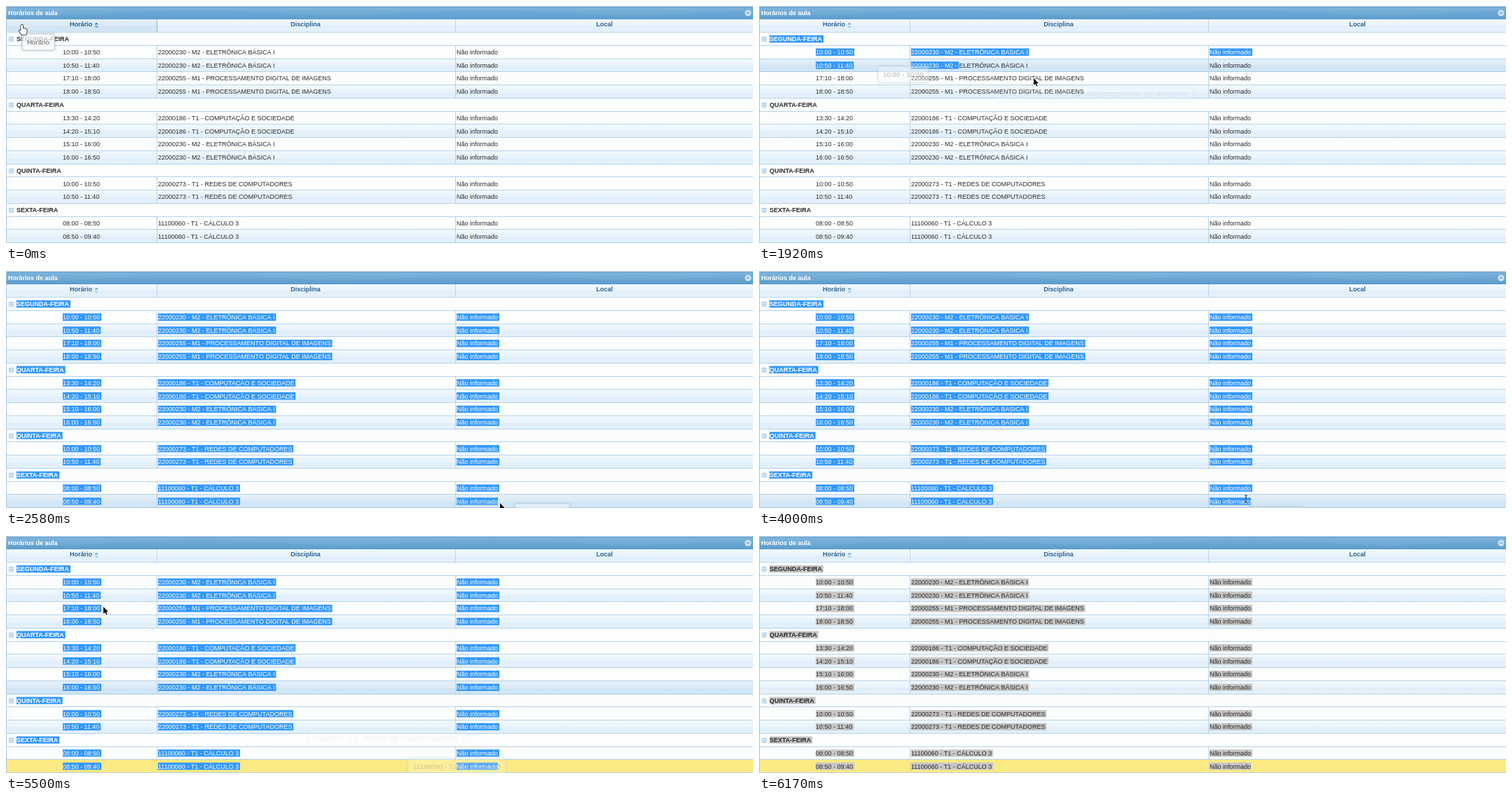
Animation of 1066 by 338 pixels, one loop 6.67 s. Source, as an HTML page with a canvas:

```html
<!DOCTYPE html>
<html lang="pt-BR">
<head>
<meta charset="utf-8">
<title>Horários de aula</title>
<style>
  html, body { margin: 0; width: 100%; height: 100%; overflow: hidden; background: #fcfdfd; }
  canvas { display: block; width: 1066px; height: 338px; }
</style>
</head>
<body>
<canvas id="stage" width="1066" height="338"></canvas>
<script>
const ctx = document.getElementById('stage').getContext('2d');
const W = 1066, H = 338, LOOP = 6670, TICK = 250 / 3;
const TOP = 38, PITCH = 18.76;
const COLUMNS = [81, 217, 643];
const FAMILY = '"Liberation Sans", Arial, sans-serif';
const REGULAR = `9px ${FAMILY}`, BOLD = `bold 9px ${FAMILY}`, TIP = `9.8px ${FAMILY}`;

const ELECTRONICS = '22000230 - M2 - ELETRÔNICA BÁSICA I';
const IMAGES = '22000255 - M1 - PROCESSAMENTO DIGITAL DE IMAGENS';
const SOCIETY = '22000186 - T1 - COMPUTAÇÃO E SOCIEDADE';
const NETWORKS = '22000273 - T1 - REDES DE COMPUTADORES';
const CALCULUS = '11100060 - T1 - CÁLCULO 3';
const NO_PLACE = 'Não informado';

const group = (day, ...lessons) => [
  { day },
  ...lessons.map(([time, course], i) => ({ cells: [time, course, NO_PLACE], even: i % 2 === 1 }))
];
const rows = [
  ...group('SEGUNDA-FEIRA', ['10:00 - 10:50', ELECTRONICS], ['10:50 - 11:40', ELECTRONICS],
    ['17:10 - 18:00', IMAGES], ['18:00 - 18:50', IMAGES]),
  ...group('QUARTA-FEIRA', ['13:30 - 14:20', SOCIETY], ['14:20 - 15:10', SOCIETY],
    ['15:10 - 16:00', ELECTRONICS], ['16:00 - 16:50', ELECTRONICS]),
  ...group('QUINTA-FEIRA', ['10:00 - 10:50', NETWORKS], ['10:50 - 11:40', NETWORKS]),
  ...group('SEXTA-FEIRA', ['08:00 - 08:50', CALCULUS], ['08:50 - 09:40', CALCULUS])
];
const LAST = rows.length - 1;

// Pointer path: tick, x, y
const path = [
  [0, 22, 27], [1, 19, 34], [3, 13, 47], [19, 13, 47], [20, 70, 55], [21, 169, 72], [22, 285, 85],
  [23, 392, 103], [24, 540, 140], [25, 659, 178], [26, 686, 196], [28, 706, 255], [30, 725, 322],
  [31, 705, 331], [35, 705, 331], [36, 696, 325], [39, 695, 325], [61, 695, 325], [62, 690, 322],
  [63, 575, 304], [64, 430, 265], [65, 320, 211], [66, 139, 101], [67, 40, 70], [68, -30, 60]
];

// Fading tooltips: first tick, duration in ticks, x, y, text, opacity at start
const tips = [
  [0, 3, 22, 39, 'Horário', .72],
  [21, 6, 169, 85, '10:00 - 10:50', .5],
  [22, 5, 335, 113, IMAGES, .1],
  [25, 5, 640, 179, SOCIETY, .32],
  [26, 4, 650, 189, NO_PLACE, .08],
  [30, 5, 725, 331, NO_PLACE, .5],
  [46, 7, 696, 336, NO_PLACE, .75],
  [63, 6, 573, 316, CALCULUS, .4],
  [64, 5, 430, 276, NETWORKS, .1]
];

function pointerAt(tick) {
  const i = path.findIndex(p => p[0] > tick);
  if (i < 0) return { x: -30, y: 60 };
  const [a, ax, ay] = path[Math.max(i - 1, 0)], [b, bx, by] = path[i];
  const k = Math.max(0, (tick - a) / (b - a));
  return { x: ax + (bx - ax) * k, y: ay + (by - ay) * k };
}

const rowAt = y => Math.min(LAST, Math.floor((y - TOP) / PITCH));

function rect(x, y, w, h, fill) {
  ctx.fillStyle = fill;
  ctx.fillRect(x, y, w, h);
}

function glass(x, y, w, h, stops) {
  const g = ctx.createLinearGradient(0, y, 0, y + h);
  [0, .5, .52, 1].forEach((at, i) => g.addColorStop(at, stops[i]));
  rect(x, y, w, h, g);
}

function text(str, x, y, color, font = REGULAR, align = 'left') {
  ctx.font = font;
  ctx.textAlign = align;
  ctx.fillStyle = color;
  ctx.fillText(str, x, y);
}

function shape(d, x, y, fill, stroke, width = 1) {
  const p = new Path2D(d);
  ctx.save();
  ctx.translate(x, y);
  if (stroke) {
    ctx.strokeStyle = stroke;
    ctx.lineWidth = width;
    ctx.lineJoin = 'round';
    ctx.stroke(p);
  }
  if (fill) {
    ctx.fillStyle = fill;
    ctx.fill(p);
  }
  ctx.restore();
}

const DEFAULT = ['#f1f8fe', '#e9f3fc', '#e1effb', '#e4f1fc'];
const HOVER = ['#e4eff9', '#dae9f6', '#d0e4f4', '#d3e7f7'];

function drawTitle() {
  const g = ctx.createLinearGradient(0, 1, 0, 19);
  g.addColorStop(0, '#5b9dcf');
  g.addColorStop(.12, '#78b0d9');
  g.addColorStop(1, '#5c9ccc');
  rect(0, 1, W, 18, g);
  rect(0, 0, W, 1, '#c3d9ea');
  ctx.beginPath();
  ctx.moveTo(0, 1);
  for (let x = 0; x <= W; x += 6) ctx.lineTo(x, 9 + 4.5 * Math.sin(x / 417 * 2 * Math.PI + .6));
  ctx.lineTo(W, 1);
  ctx.fillStyle = 'rgba(255,255,255,.04)';
  ctx.fill();
  text('Horários de aula', 3, 13, '#fff', BOLD);
  ctx.beginPath();
  ctx.arc(1059, 10, 4.6, 0, 7);
  ctx.fillStyle = '#cfe2f0';
  ctx.fill();
  shape('M-2.2 1.1L0 -1.1L2.2 1.1', 1059, 10, null, '#6fa8d3', 1.3);
}

function drawColumns(hovered) {
  glass(0, 19, W, 19, DEFAULT);
  if (hovered) glass(0, 19, 215, 19, HOVER);
  rect(0, 37, W, 1, '#bfd8ec');
  rect(215, 19, 1, 19, hovered ? '#79b7e7' : '#b9d5ea');
  rect(641, 19, 1, 19, '#b9d5ea');
  const ink = '#28608f', base = 29.4;
  text('Horário', 91, base, hovered ? '#1d5987' : ink, BOLD);
  text('Disciplina', 427.5, base, ink, BOLD, 'center');
  text('Local', 854, base, ink, BOLD, 'center');
  shape('M-3 -1L0 -4L3 -1Z', 129, 27.5, hovered ? '#3b87c0' : '#72a9d2');
  shape('M-3 1L0 4L3 1Z', 129, 27.5, hovered ? '#5fa3d6' : '#a3c8e4');
}

function drawLabel(str, x, mid, font, end, pad, active) {
  const base = mid + 3.2;
  text(str, x, base, '#2a2a2a', font);
  const width = Math.min(end - x, ctx.measureText(str).width + pad);
  if (width <= 0) return;
  ctx.save();
  ctx.beginPath();
  ctx.rect(x, mid - 5.2, width, 10.4);
  ctx.clip();
  rect(x, mid - 6, width, 12, active ? '#3297fd' : '#c6c6c6');
  text(str, x, base, active ? '#fff' : '#2a2a2a', font);
  ctx.restore();
}

function drawRow(row, i, state) {
  const y = Math.round(TOP + PITCH * i), h = Math.round(TOP + PITCH * (i + 1)) - y;
  const mid = 47 + PITCH * i;
  const end = i < state.endRow ? Infinity : i === state.endRow ? state.endX : -1;
  const marked = i === LAST && state.marked;
  const hovered = i === state.hover && row.cells && !marked;
  if (marked) rect(0, y, W, h, '#fbe983');
  else if (hovered) glass(0, y, W, h, HOVER);
  else if (row.even) glass(0, y, W, h, DEFAULT);
  else rect(0, y, W, h, '#fcfdfd');
  rect(0, y + h - 1, W, 1, hovered ? '#a3cbe9' : '#b5d2e8');

  if (row.day) {
    const top = Math.round(mid) - 2.5;
    ctx.strokeStyle = '#84b8de';
    ctx.lineWidth = 1;
    ctx.strokeRect(5, top, 5, 5.5);
    rect(6.5, top + 2.25, 2, 1, '#3b87c0');
    drawLabel(row.day, 15, mid, BOLD, end, 2, state.active);
    return;
  }
  for (const x of [215, 641]) rect(x, y, 1, h, marked ? '#e6dda0' : '#b5d2e8');
  row.cells.forEach((str, c) => {
    const pad = i === LAST && c === 2 ? 0 : 2;
    drawLabel(str, COLUMNS[c], mid, REGULAR, end, pad, state.active);
  });
}

function drawTip([start, span, x, y, str, peak], tick) {
  const age = tick - start;
  if (age < 0 || age >= span) return;
  ctx.save();
  ctx.globalAlpha = peak * (1 - age / span);
  ctx.font = TIP;
  ctx.textAlign = 'left';
  const width = ctx.measureText(str).width + 15;
  ctx.beginPath();
  ctx.roundRect(x + .5, y + .5, width, 24, 3);
  ctx.fillStyle = '#fcfdfd';
  ctx.fill();
  ctx.shadowColor = 'rgba(70,90,110,.5)';
  ctx.shadowBlur = 3;
  ctx.strokeStyle = '#9dc0da';
  ctx.lineWidth = 1;
  ctx.stroke();
  ctx.shadowColor = 'transparent';
  text(str, x + 8, y + 16, '#222', TIP);
  ctx.restore();
}

const ARROW = 'M0 0V10L2.3 7.8L4 11.6L5.4 11L3.9 7.3H7Z';
const HAND = 'M0 0Q1.6 -.8 2 .8V5Q3.4 4.3 4 5.4Q5.4 4.9 6 6Q7.6 5.8 7.7 7.2V10L6.5 14H.2L-3.2 8.8Q-3.3 7 -1.7 7.6L-.7 8.7V.8Q-.6 .2 0 0Z';
const BEAM = 'M-2 -5H-.6L0 -4.4L.6 -5H2M0 -4.4V4.4M-2 5H-.6L0 4.4L.6 5H2';

function drawPointer({ x, y }, tick) {
  if (x < 0) return;
  if (tick < 2) shape(HAND, x, y, '#fff', '#222', 1.6);
  else if (tick >= 36 && tick < 62) shape(BEAM, x, y, null, '#222');
  else shape(ARROW, x, y, '#000', 'rgba(255,255,255,.8)', 1.4);
}

function draw(ms) {
  const tick = Math.floor((ms + 5) / TICK);
  const late = pointerAt(tick - 1);   // the page reacts one tick behind the pointer
  const done = tick >= 31, selecting = tick >= 19;
  const state = {
    endRow: done ? LAST : selecting ? rowAt(late.y) : -1,
    endX: done ? W : late.x,
    hover: late.x < 0 ? -1 : rowAt(late.y),
    marked: tick >= 51,
    active: tick < 74
  };
  drawTitle();
  drawColumns(tick < 2);
  rows.forEach((row, i) => drawRow(row, i, state));
  rect(0, 1, 1, H, '#a6c9e2');
  tips.forEach(tip => drawTip(tip, tick));
  drawPointer(pointerAt(tick), tick);
}

const begin = performance.now();
function frame() {
  draw((performance.now() - begin) % LOOP);
  requestAnimationFrame(frame);
}
frame();
</script>
</body>
</html>
```
